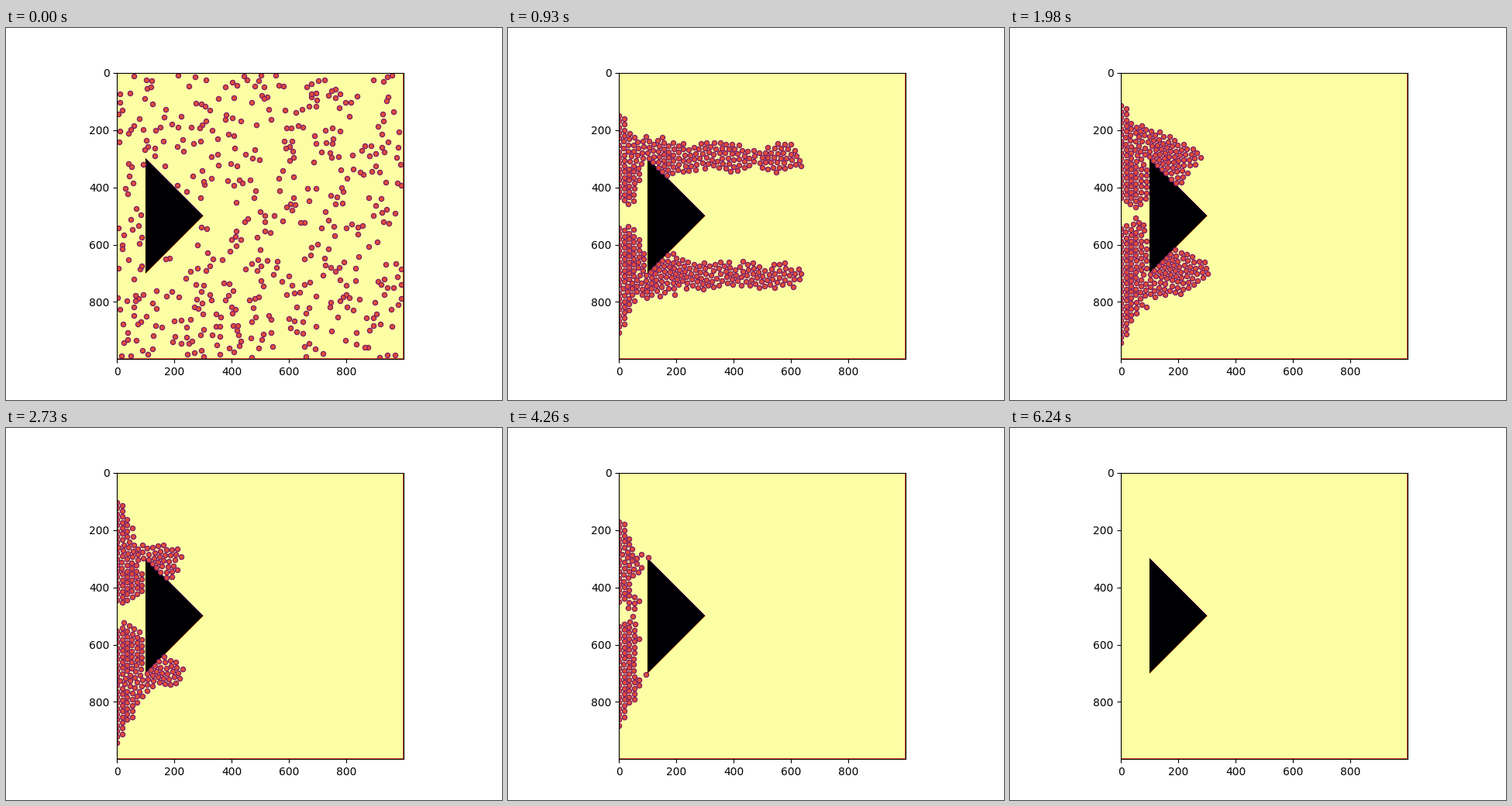
Write a matplotlib script that moves like this. It is 640x480 px and loops after 6300 ms.

```python
import numpy as np
import matplotlib.pyplot as plt
from matplotlib.animation import FuncAnimation

SIZE, FRAMES, INTERVAL = 1000, 210, 30
PEOPLE, DIAMETER, DOOR_Y = 470, 20.0, 495.0
EMPTY_AT = 207
ROOT2 = np.sqrt(2)
NORMALS = np.array([[-1, 0], [1 / ROOT2, -1 / ROOT2], [1 / ROOT2, 1 / ROOT2]])


def triangle_depth(x, y, pad=0.0):
    """Depth behind each face of the wedge; all positive means inside."""
    return np.stack([x - 100, (y - x - 200) / ROOT2, (800 - x - y) / ROOT2]) + pad


def start_positions(rng):
    pts = []
    while len(pts) < PEOPLE:
        q = rng.uniform(2, SIZE - 3, 2)
        if triangle_depth(*q, 6).min() > 0:
            continue
        if pts and np.hypot(*(np.array(pts) - q).T).min() < 12:
            continue
        pts.append(q)
    return np.array(pts)


def drift(p):
    """Wish velocity: round the wedge corners first, then to the door."""
    x, y = p.T
    ahead = x > 100
    dy = np.where(ahead, np.where(y < 500, 300, 700), DOOR_Y) - y
    top = np.where(ahead, 12.2, 8.0)
    pull = np.where(ahead, 0.07, 0.2)
    return np.column_stack([-np.minimum(12.0, x), np.clip(pull * dy, -top, top)])


def keep_out(p):
    np.clip(p, 0, SIZE - 3, out=p)
    depth = triangle_depth(*p.T, 4)
    push = np.maximum(depth.min(axis=0), 0)
    p += push[:, None] * NORMALS[depth.argmin(axis=0)]


def separate(p, rounds=36, stiffness=0.3):
    n = len(p)
    gap = p[:, None] - p[None]
    i, j = np.nonzero(np.triu((gap ** 2).sum(axis=2) < 34 ** 2, 1))
    for _ in range(rounds):
        d = p[j] - p[i]
        dist = np.hypot(d[:, 0], d[:, 1]) + 1e-9
        d *= (stiffness * np.maximum(DIAMETER - dist, 0) / dist)[:, None]
        for axis in (0, 1):
            p[:, axis] += (np.bincount(j, d[:, axis], n)
                           - np.bincount(i, d[:, axis], n))
        keep_out(p)


def leave(p, k):
    """Mask of people still inside after those at the door have gone."""
    stay = np.full(len(p), k <= EMPTY_AT)
    target = PEOPLE * max(0, 1 - k / EMPTY_AT) ** 1.16
    quota = int(np.clip(len(p) - target, 0, 4))
    dist = np.hypot(p[:, 0], p[:, 1] - DOOR_Y)
    first = np.argsort(dist)[:quota]
    stay[first[dist[first] < 40]] = False
    return stay


def simulate():
    p = start_positions(np.random.default_rng(12))
    pace = np.ones(len(p))
    history = [p.copy()]
    for k in range(1, FRAMES):
        if len(p):
            before, wish = p.copy(), drift(p)
            for _ in range(2):
                p += 0.5 * pace[:, None] * drift(p)
                keep_out(p)
                separate(p)
            # people stuck in the queue push less
            progress = ((p - before) * wish).sum(axis=1) / ((wish ** 2).sum(axis=1) + 1e-9)
            pace = np.clip(0.12 + 1.4 * progress, 0.12, 1)
            stay = leave(p, k)
            p, pace = p[stay], pace[stay]
        history.append(p.copy())
    return history


def floor_plan(n=370):
    """Free space is 1, walls are 0, with soft edges."""
    cell = SIZE / n
    c = (np.arange(n) + 0.5) * cell - 0.5
    x, y = np.meshgrid(c, c)
    plan = np.clip(0.5 - triangle_depth(x, y, 0.6).min(axis=0) / cell, 0, 1)
    plan[-1, :] = plan[:, -1] = 0.62
    return plan


history = simulate()

fig, ax = plt.subplots(figsize=(6.4, 4.8), dpi=100)
edge = SIZE - 0.5
ax.imshow(floor_plan(), cmap="inferno", vmin=0, vmax=1, interpolation="nearest",
          extent=(-0.5, edge, edge, -0.5))
crowd = ax.scatter(*history[0].T, s=20, linewidths=0.9,
                   facecolors="#e04b38", edgecolors="#7a1c66", zorder=2)
ax.set_xlim(-0.5, edge)
ax.set_ylim(edge, -0.5)
ax.set_xticks(range(0, SIZE, 200))
ax.set_yticks(range(0, SIZE, 200))


def update(k):
    crowd.set_offsets(history[k])
    return crowd,


anim = FuncAnimation(fig, update, frames=FRAMES, interval=INTERVAL,
                     repeat=True, repeat_delay=0, blit=False)
plt.show()
```
